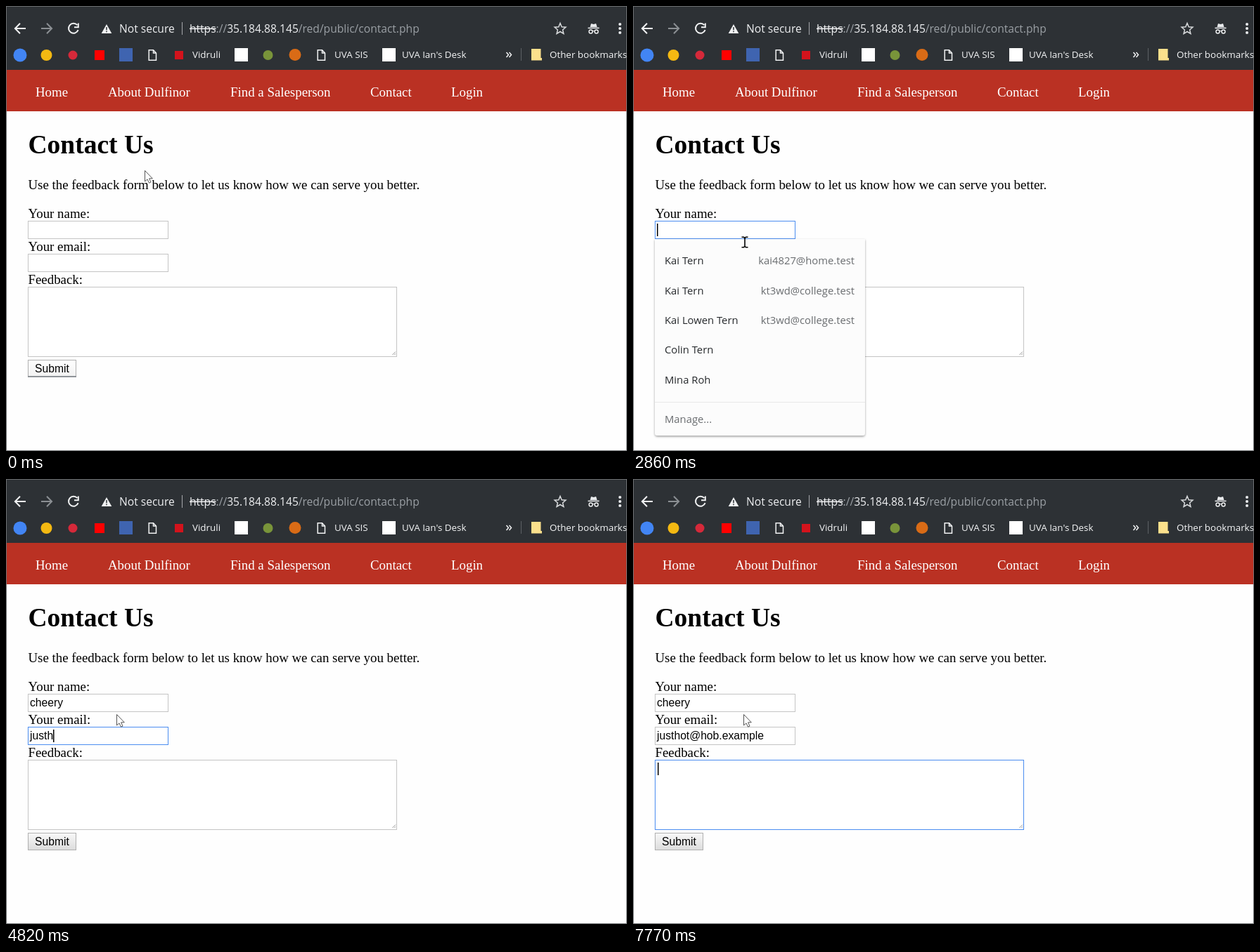
An HTML page that plays this animation: 883x634 px, repeating every 8000 ms.

```html
<!DOCTYPE html>
<html lang="en">
<head>
<meta charset="utf-8">
<title>Contact form</title>
<style>
  html, body { margin: 0; width: 100%; height: 100%; overflow: hidden; background: #fefefe; }
  svg { display: block; width: 100%; height: 100%; }
  text { white-space: pre; }
  .ui { font-family: "Open Sans", "Noto Sans", sans-serif; }
  .address { font-size: 15.6px; fill: #eff0f2; }
  .bookmarks { font-size: 13.4px; fill: #f4f5f6; }
  .menu { font-size: 14.8px; fill: #26292c; }
  .menu .soft { fill: #6a6d70; }
  .menu .mail { fill: #6a6d70; text-anchor: end; }
  .page { font: 18.88px "Liberation Serif", "Times New Roman", serif; }
  .title { font-size: 37.5px; font-weight: bold; }
  .nav { fill: #fff; }
  .form { font: 15.7px "Liberation Sans", Arial, sans-serif; }
  .dim { fill: #9ba0a5; }
  .struck { text-decoration: line-through; }
  .line { fill: none; stroke: #f1f2f3; stroke-width: 2; }
  .field { fill: #fff; stroke: #c4c4c4; }
  .field.focus { stroke: #4b8df0; }
  .hidden { display: none; }
</style>
</head>
<body>
<svg viewBox="0 0 883 634" xmlns="http://www.w3.org/2000/svg">
  <defs>
    <linearGradient id="face" x2="0" y2="1">
      <stop offset="0" stop-color="#f8f8f8"/><stop offset=".4" stop-color="#ededed"/><stop offset="1" stop-color="#dcdcdc"/>
    </linearGradient>
    <linearGradient id="faceLight" x2="0" y2="1">
      <stop offset="0" stop-color="#fff"/><stop offset="1" stop-color="#f1f1f1"/>
    </linearGradient>
    <filter id="shadow" x="-5%" y="-5%" width="110%" height="110%">
      <feDropShadow dx="0" dy="1.5" stdDeviation="1.5" flood-opacity=".38"/>
    </filter>
    <path id="sheet" class="line" style="stroke-width:1.5" d="M.7 .7H7L11 5V15.3H.7ZM7 .7V5H11"/>
  </defs>

  <rect width="883" height="634" fill="#fefefe"/>
  <rect width="883" height="91" fill="#2d3135"/>
  <rect y="91" width="883" height="59" fill="#ba3123"/>

  <g class="line">
    <path d="M28 32H13M20 24.8L12.9 32L20 39.2"/>
    <path d="M50 32H65M58 24.8L65.1 32L58 39.2" stroke="#8b8f93"/>
    <path d="M101.3 27.2A7 7 0 1 0 102.6 34.2M102.8 24.6V30.2H97"/>
    <path d="M250.5 23V41" stroke="#a5a8ab" stroke-width="1"/>
    <path d="M732.5 60V78" stroke="#5d6165" stroke-width="1"/>
    <path d="M788 24.5L790.2 29.7L795.9 30.2L791.6 33.9L792.9 39.5L788 36.5L783.1 39.5L784.4 33.9L780.1 30.2L785.8 29.7Z" stroke="#d9dbdd" stroke-width="1.5"/>
    <path d="M711.5 66L714.5 69.5L711.5 73M715.5 66L718.5 69.5L715.5 73" stroke-width="1.5"/>
  </g>
  <path d="M143 26L150.3 39H135.7Z" fill="#f1f2f3"/>
  <path d="M143 30V34.3M143 35.6V37.2" stroke="#2d3135" stroke-width="1.5"/>
  <g fill="#e9ebed">
    <path d="M830.5 30L832 25L835.5 26L839 25L840.5 30Z"/>
    <rect x="827.5" y="30.6" width="16" height="1.6"/>
    <circle cx="873" cy="26" r="2"/><circle cx="873" cy="32" r="2"/><circle cx="873" cy="38" r="2"/>
  </g>
  <path d="M834 36Q835.5 35 837 36" class="line" style="stroke-width:1.2"/>
  <circle cx="831.5" cy="36.5" r="2.5" class="line" style="stroke-width:1.4"/>
  <circle cx="839.5" cy="36.5" r="2.5" class="line" style="stroke-width:1.4"/>

  <g class="ui address">
    <text x="161" y="38">Not secure</text>
    <text x="261" y="38"><tspan class="struck">https</tspan><tspan class="dim">://</tspan>35.184.88.145<tspan class="dim">/red/public/contact.php</tspan></text>
  </g>

  <circle cx="20" cy="70" r="9.5" fill="#4285f4"/>
  <circle cx="57.5" cy="70" r="8" fill="#f4b912"/>
  <circle cx="95" cy="70" r="6.5" fill="#d5293a"/>
  <rect x="126" y="63" width="14" height="14" fill="#f00"/>
  <rect x="161" y="60" width="19" height="19" fill="#3f64b0"/>
  <rect x="240" y="64" width="12" height="12" fill="#d3131c"/>
  <rect x="325" y="60" width="19" height="19" fill="#fff"/>
  <circle cx="372.5" cy="70" r="7" fill="#79943a"/>
  <circle cx="411" cy="69.5" r="8.5" fill="#d96b16"/>
  <rect x="535" y="60" width="19" height="19" fill="#fff"/>
  <use href="#sheet" x="202.5" y="62"/>
  <use href="#sheet" x="442.5" y="62"/>
  <path d="M747 61H760.5V74H762V77.5H747Z" fill="#fbe08c"/>
  <g class="ui bookmarks">
    <text x="265" y="74">Vidruli</text>
    <text x="467" y="74">UVA SIS</text>
    <text x="563" y="74">UVA Ian's Desk</text>
    <text x="773" y="74">Other bookmarks</text>
  </g>

  <g class="page">
    <g class="nav">
      <text x="42" y="129">Home</text>
      <text x="145" y="129">About Dulfinor</text>
      <text x="319" y="129">Find a Salesperson</text>
      <text x="518" y="129">Contact</text>
      <text x="633" y="129">Login</text>
    </g>
    <text class="title" x="31.5" y="210">Contact Us</text>
    <text x="31.5" y="261">Use the feedback form below to let us know how we can serve you better.</text>
    <text x="31.5" y="302">Your name:</text>
    <text x="31.5" y="349">Your email:</text>
    <text x="31.5" y="396">Feedback:</text>
  </g>

  <g class="form">
    <rect id="nameBox" class="field" x="31.5" y="306.5" width="199" height="25"/>
    <rect id="emailBox" class="field" x="31.5" y="353.5" width="199" height="25"/>
    <rect id="noteBox" class="field" x="31.5" y="400.5" width="524" height="99"/>
    <path d="M549.5 497L554 492.5M552.3 497L554 495.3" stroke="#999"/>
    <text id="nameText" x="34" y="324"></text>
    <text id="emailText" x="34" y="371"></text>
    <path id="squiggle" fill="none" stroke="#e03a35" stroke-width="1.2"/>
    <rect id="button" x="31.5" y="504.5" width="68" height="24" stroke="#b0b0b0"/>
    <path id="buttonEdge" d="M31 528H100" stroke="#8f9398" stroke-width="2"/>
    <text x="41" y="522">Submit</text>
  </g>

  <g id="menu" class="ui menu">
    <path d="M31 332H330V608Q330 612 326 612H35Q31 612 31 608Z" fill="#fcfcfc" filter="url(#shadow)"/>
    <path d="M31 564.5H330" stroke="#e9e9e9"/>
    <text x="45" y="368">Kai Tern</text><text class="mail" x="315" y="368">kai4827@home.test</text>
    <text x="45" y="411">Kai Tern</text><text class="mail" x="315" y="411">kt3wd@college.test</text>
    <text x="45" y="453">Kai Lowen Tern</text><text class="mail" x="315" y="453">kt3wd@college.test</text>
    <text x="45" y="495">Colin Tern</text>
    <text x="45" y="538">Mina Roh</text>
    <text class="soft" x="45" y="594">Manage...</text>
  </g>

  <rect id="caret" width="1.5" height="18"/>
  <path id="arrow" d="M.5 .5V16L4 12.8L6.5 18.2L9 17L6.6 11.8H11.3Z" fill="#fff" stroke="#555" stroke-width="1"/>
  <path id="beam" d="M-4.5 -7.2H-1.5L0 -6L1.5 -7.2H4.5M0 -6.5V6.5M-4.5 7.2H-1.5L0 6L1.5 7.2H4.5" fill="none" stroke="#000" stroke-width="1.6"/>
  <rect x=".5" y=".5" width="882" height="633" fill="none" stroke="#6c6e70"/>
</svg>

<script>
const LOOP = 8000;
const NAME = "cheery";
const EMAIL = "justhot@hob.example";

// Each track lists [start ms, value...] in order.
const pointer = [
  [0, "arrow", 197, 234], [130, "arrow", 190, 252], [280, "arrow", 176, 282],
  [440, "beam", 164, 312], [740, "beam", 163, 319], [890, "beam", 161, 329],
  [1030, "beam", 159, 336.5], [2980, "arrow", 157, 335]
];
const focus = [[0, ""], [440, "name"], [3560, "email"], [7770, "note"]];
const blink = [[0, true], [1160, false], [1590, true], [2150, false], [2710, true]];
const nameKeys = [[0, 0], [2980, 1], [3110, 2], [3260, 4], [3410, 6]];
const emailKeys = [
  [0, 0], [3970, 1], [4100, 2], [4240, 3], [4540, 4], [4820, 5], [5230, 6], [5530, 7],
  [5940, 8], [6220, 9], [6360, 10], [6500, 12], [6650, 13], [6790, 14], [6910, 15],
  [7190, 16], [7330, 18], [7490, 19]
];

const el = id => document.getElementById(id);
const at = (track, t) => track.filter(step => step[0] <= t).pop().slice(1);
const show = (id, on) => el(id).classList.toggle("hidden", !on);
const between = (t, from, to) => t >= from && t < to;

el("squiggle").setAttribute("d", "M34 374q1 -2.6 2 0" + "t2 0".repeat(22));

function setText(id, value) {
  if (el(id).textContent !== value) el(id).textContent = value;
}

function placeCaret(field) {
  const typed = { name: "nameText", email: "emailText" }[field];
  const x = typed ? Math.floor(34 + el(typed).getComputedTextLength()) : 35;
  const y = { name: 310, email: 357, note: 404 }[field];
  el("caret").setAttribute("x", x);
  el("caret").setAttribute("y", y);
}

function render(t) {
  const [field] = at(focus, t);
  setText("nameText", NAME.slice(0, at(nameKeys, t)[0]));
  setText("emailText", EMAIL.slice(0, at(emailKeys, t)[0]));

  for (const id of ["name", "email", "note"]) {
    el(id + "Box").classList.toggle("focus", id === field);
  }
  show("caret", field && at(blink, t)[0]);
  if (field) placeCaret(field);

  show("menu", between(t, 590, 2980));
  show("squiggle", between(t, 5940, 7770));
  show("buttonEdge", t < 590);
  el("button").setAttribute("fill", t < 590 ? "url(#faceLight)" : "url(#face)");

  const [shape, x, y] = at(pointer, t);
  show("arrow", shape === "arrow");
  show("beam", shape === "beam");
  el(shape).setAttribute("transform", `translate(${x} ${y})`);
}

let start;
function tick(now) {
  start ??= now;
  render((now - start) % LOOP);
  requestAnimationFrame(tick);
}
render(0);
requestAnimationFrame(tick);
</script>
</body>
</html>
```
